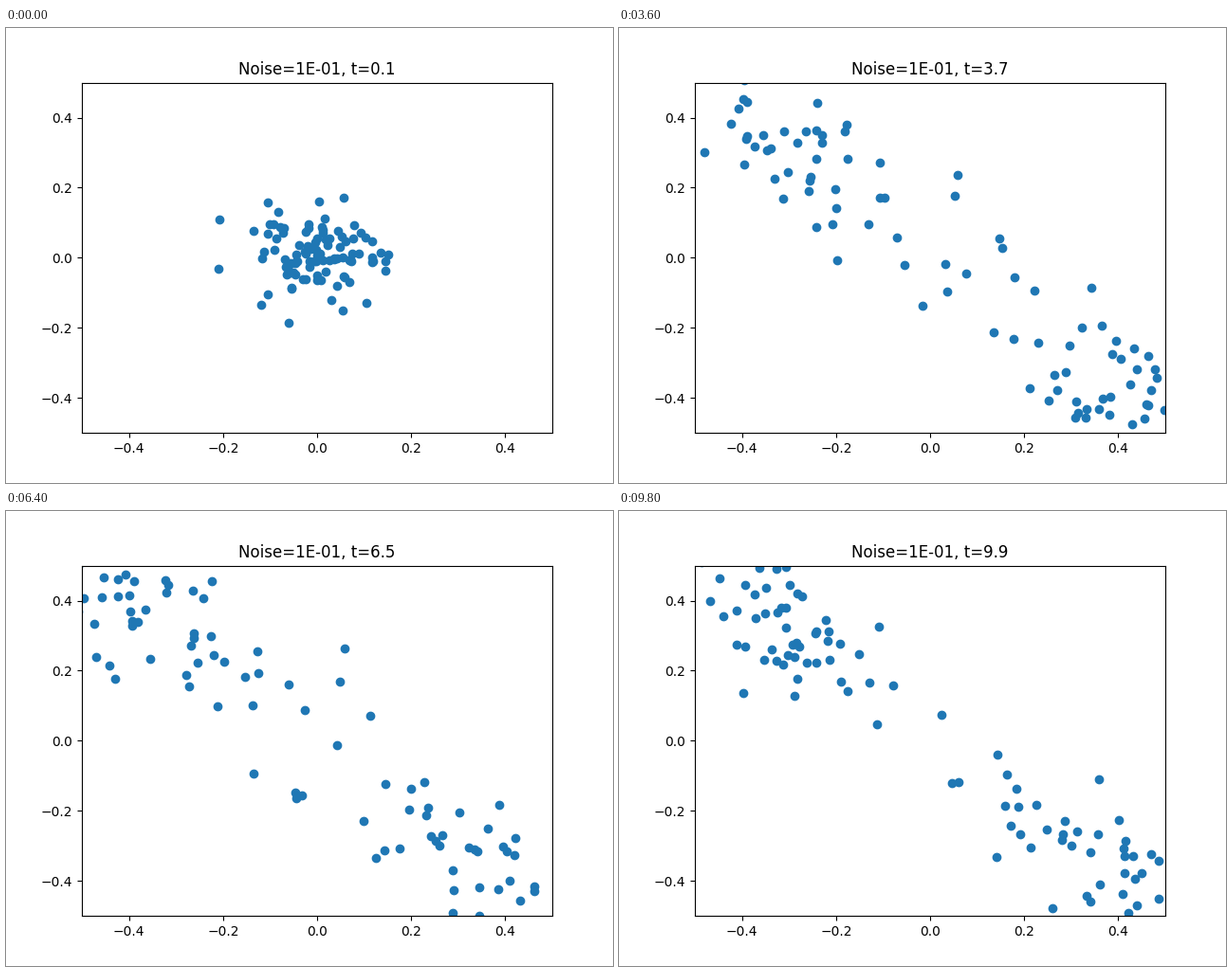
A matplotlib script that plays this animation: 640 px wide and 480 px high, repeating every 9.9 s.

```python
import numpy as np
import matplotlib.pyplot as plt
from matplotlib.animation import FuncAnimation

N, STEPS, DT = 100, 99, 0.1
NOISE = 0.1
SIGMA = np.sqrt(NOISE / 2)      # diffusion per unit of sqrt(time)
PUSH, GAIN = 0.51, 4.0          # saturating push away from the centre


def drift(p):
    """Double well along the anti-diagonal, restoring force across it."""
    across = (p[:, 0] + p[:, 1]) / np.sqrt(2)
    along = (p[:, 0] - p[:, 1]) / np.sqrt(2)
    d_across = -(3 + 6 * along**2) * across
    d_along = PUSH * np.tanh(GAIN * along) - along
    return np.column_stack([d_along + d_across,
                            d_across - d_along]) / np.sqrt(2)


def simulate(seed=4):
    """All points start at the origin; the first shown state is one step on."""
    rng = np.random.default_rng(seed)
    p = np.zeros((N, 2))
    path = []
    for _ in range(STEPS):
        kick = SIGMA * np.sqrt(DT) * rng.standard_normal(p.shape)
        p = p + drift(p) * DT + kick
        path.append(p)
    return np.array(path)


path = simulate()

fig, ax = plt.subplots(figsize=(6.4, 4.8), dpi=100)
ax.set(xlim=(-0.5, 0.5), ylim=(-0.5, 0.5))
dots, = ax.plot([], [], "o", color="#1f77b4")
title = ax.set_title("")


def draw(i):
    dots.set_data(path[i, :, 0], path[i, :, 1])
    title.set_text(f"Noise={NOISE:.0E}, t={(i + 1) * DT:.1f}")
    return dots, title


anim = FuncAnimation(fig, draw, frames=STEPS, interval=100, repeat=True,
                     repeat_delay=0)
plt.show()
```
